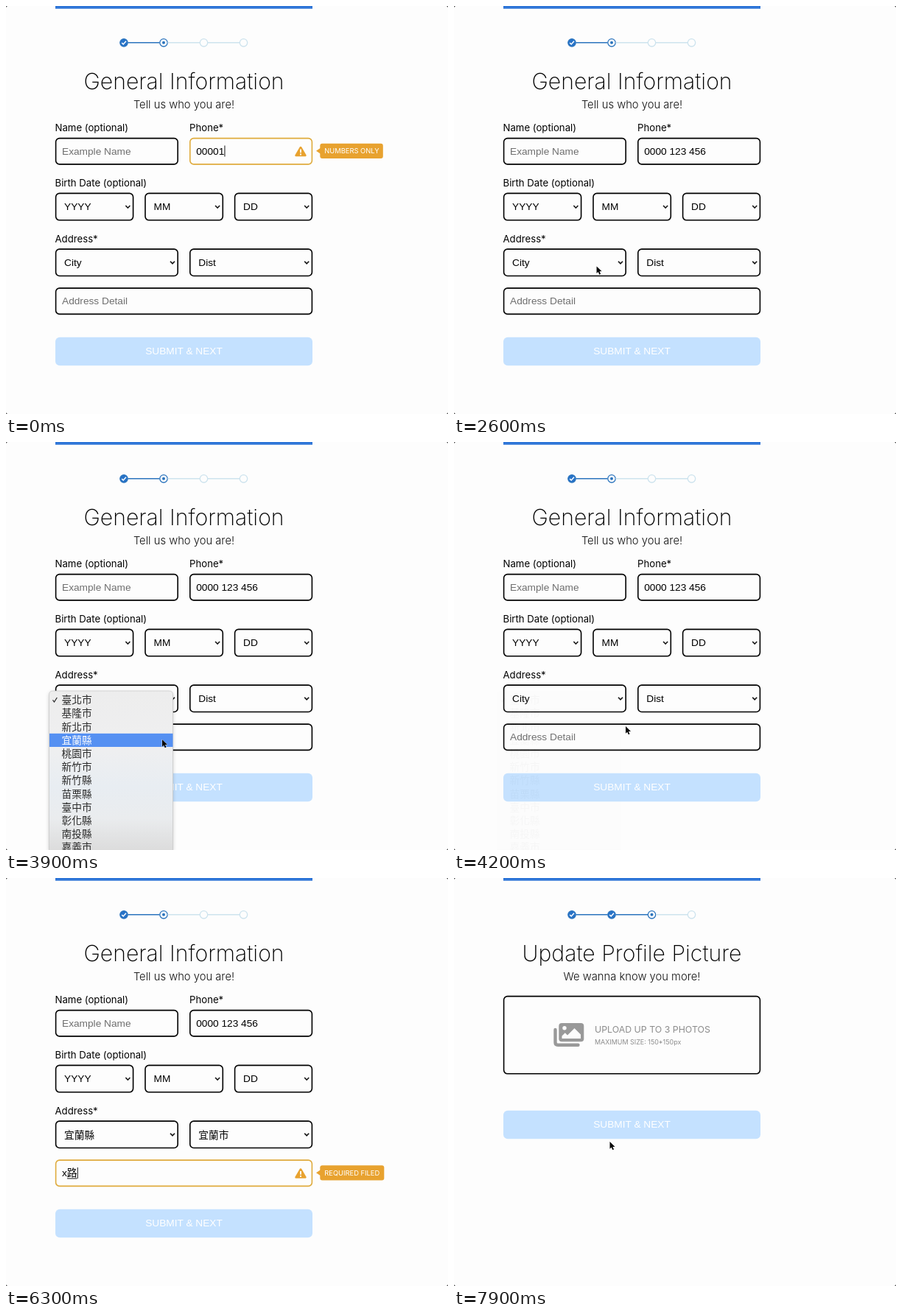
An HTML page for the animation above (8000 ms loop, 600 px wide and 554 px high).

```html
<!DOCTYPE html>
<html lang="en">
<head>
<meta charset="utf-8">
<title>Sign-up form</title>
<style>
  html, body { margin: 0; width: 100%; height: 100%; overflow: hidden; background: #fdfdfd; }
  svg { display: block; }
  text { white-space: pre; font-optical-sizing: none; }
  .ui { font-family: Inter, "Noto Sans", sans-serif; }
  .field { font: 13.7px "Liberation Sans", "Noto Sans CJK TC", "Noto Sans CJK", sans-serif; }
  .menu { font: 13.7px "Noto Sans CJK TC", "Noto Sans CJK", sans-serif; }
</style>
</head>
<body>
<svg id="stage" width="600" height="554" viewBox="0 0 600 554"></svg>
<script>
const LOOP = 8000, STEP = 100;
const BLUE = '#2f76d8', PALE = '#c4e1ff', ORANGE = '#e8a22f', GREY = '#6e6e6e', INK = '#000';

// [time, value] tables
const PHONE = [[0, '00001'], [200, '000012'], [400, '0000123'], [600, '00001234'],
  [800, '000012345'], [1000, '0000 123 456']];
const STREET = [[0, ''], [5000, 'x'], [5800, 'xㄌ'], [6000, 'xㄌㄨ'], [6200, 'x路']];
const PHONE_BLUR = 2700, STREET_FOCUS = 4700, VALID = 6500, NEXT_PAGE = 7600;
const MENU_OPEN = 2800, MENU_PICK = 3950, MENU_FADE = 300, PICKED = 4300;
const CITIES = ['臺北市', '基隆市', '新北市', '宜蘭縣', '桃園市', '新竹市', '新竹縣', '苗栗縣',
  '臺中市', '彰化縣', '南投縣', '嘉義市'];

// [time, x, y] of the pointer tip, one table per visible stretch
const POINTER = [
  [[1500, 300, 235], [1800, 258, 306], [2300, 202, 350], [2700, 192, 354], [3300, 197, 371],
    [3700, 206, 392], [3900, 212, 404], [4200, 233, 386], [4600, 230, 400], [4900, 230, 402]],
  [[7300, 236, 440], [7500, 228, 462], [7600, 226, 460], [7900, 211.5, 358]]
];

const stage = document.getElementById('stage');
const at = (table, t) => table.filter(row => row[0] <= t).pop();

function pointerAt(t) {
  const path = POINTER.find(p => t >= p[0][0] && t <= p[p.length - 1][0]);
  if (!path) return null;
  const i = Math.max(1, path.findIndex(p => p[0] >= t));
  const [t0, x0, y0] = path[i - 1], [t1, x1, y1] = path[i];
  const u = (t - t0) / (t1 - t0), e = u * u * (3 - 2 * u);
  return [x0 + (x1 - x0) * e, y0 + (y1 - y0) * e];
}

const text = (x, y, str, attrs = '', cls = 'field') =>
  `<text class="${cls}" x="${x}" y="${y}" ${attrs}>${str.replace('&', '&amp;')}</text>`;
const ui = (x, y, str, size, attrs = '') =>
  text(x, y, str, `font-size="${size}" ${attrs}`, 'ui');
const box = (x, y, w, h, color = INK) =>
  `<rect x="${x}" y="${y}" width="${w}" height="${h}" rx="5" fill="none" stroke="${color}" stroke-width="1.6"/>`;

function select(x, y, w, value) {
  const cx = x + w - 7.2, cy = y + 18.3;
  const cjk = value.charCodeAt(0) > 255;
  return box(x, y, w, 36.4) + text(x + 11.5, y + (cjk ? 24.2 : 22.8), value, `fill="${INK}"`) +
    `<path d="M${cx - 3} ${cy - 1.7}l3 3.2l3-3.2" fill="none" stroke="#111" stroke-width="1.6"/>`;
}

function stepper(current) {
  const xs = [160, 214, 268.5, 322.5], y = 49.8, dark = '#2b74bd', light = '#cde3ee';
  return xs.map((x, i) => {
    const color = i <= current ? dark : light;
    const line = i ? `<path d="M${xs[i - 1] + 5.5} ${y}H${x - 5.5}" stroke="${color}" stroke-width="1.5"/>` : '';
    const ring = `<circle cx="${x}" cy="${y}" r="5.2" fill="${i < current ? '#2873c8' : '#fdfdfd'}" stroke="${color}" stroke-width="1.3"/>`;
    const mark = i < current
      ? `<path d="M${x - 2.8} ${y + .2}l2 2l3.8-4.2" fill="none" stroke="#fff" stroke-width="1.5"/>`
      : i === current ? `<circle cx="${x}" cy="${y}" r="2" fill="${dark}"/>` : '';
    return line + ring + mark;
  }).join('');
}

function header(step, title, subtitle) {
  const middle = 'text-anchor="middle"';
  return `<rect x="67" width="349" height="3.7" fill="${BLUE}"/>` + stepper(step) +
    ui(241.5, 112.8, title, 30.2, `${middle} font-weight="250" fill="${INK}"`) +
    ui(241.5, 138.9, subtitle, 14.75, `${middle} font-weight="300" fill="#111"`);
}

const button = (y, active) =>
  `<rect x="67" y="${y}" width="349" height="38.5" rx="6" fill="${active ? BLUE : PALE}"/>` +
  text(241.5, y + 23.4, 'SUBMIT & NEXT', 'text-anchor="middle" fill="#fff"');

// Warning sign inside the field and its callout to the right
function warning(y, message, width) {
  return `<path d="M400 ${y - 5}L406.4 ${y + 6}H393.6Z" fill="${ORANGE}" stroke="${ORANGE}" stroke-width="2.6" stroke-linejoin="round"/>
    <path d="M400 ${y - 2.6}V${y + 2.2}M400 ${y + 3.6}V${y + 5.4}" stroke="#fff" stroke-width="1.8"/>
    <rect x="426.3" y="${y - 10.3}" width="${width}" height="20.4" rx="3" fill="${ORANGE}"/>
    <path d="M421 ${y - .2}l6-4v8z" fill="${ORANGE}"/>` +
    ui(432.3, y + 3.1, message, 9.35, 'fill="#fff"');
}

function input(id, x, y, w, value, hint, error) {
  return box(x, y, w, 35.3, error ? '#dfab3d' : INK) +
    text(x + 8.4, y + 21.9, value || hint, `id="${id}" fill="${value ? INK : GREY}"`);
}

function menu(t, pointer) {
  if (t < MENU_OPEN || t >= MENU_PICK + MENU_FADE) return '';
  const fade = Math.max(0, (t - MENU_PICK) / MENU_FADE);
  const top = 341.2, row = 18.2;
  const hot = Math.floor((Math.min(pointer[1], 412) - top) / row);
  const rows = CITIES.map((city, i) => {
    const y = top + i * row, on = i === hot && !fade;
    return (on ? `<rect x="59" y="${y}" width="167.5" height="${row}" fill="#5590f2"/>` : '') +
      text(75.5, y + 14, city, `fill="${on ? '#fff' : '#2b2b2b'}"`, 'menu') +
      (i ? '' : `<path d="M63.5 ${y + 9.2}l2 2.6l3.8-6" fill="none" stroke="${on ? '#fff' : '#222'}" stroke-width="1.2"/>`);
  }).join('');
  return `<g opacity="${(1 - fade) ** 2}">
    <path d="M58.5 554V343q0-5 5-5H221.5q5 0 5 5V554" fill="url(#glass)" stroke="#c4c4c4" stroke-width=".7" filter="url(#shade)"/>${rows}</g>`;
}

function formPage(t, pointer) {
  const phone = at(PHONE, t)[1], street = at(STREET, t)[1];
  const badPhone = t < 1000, badStreet = t >= 5000 && t < VALID, picked = t >= PICKED;
  const label = (x, y, str) => ui(x, y, str, 13.2, `fill="${INK}"`);
  return header(1, 'General Information', 'Tell us who you are!') +
    label(66.5, 170, 'Name (optional)') + label(249, 170, 'Phone*') +
    label(66.5, 245, 'Birth Date (optional)') + label(66.5, 321, 'Address*') +
    input('name', 67.6, 179.6, 165.6, '', 'Example Name') +
    input('phone', 249.8, 179.6, 165.6, phone, '', badPhone) +
    select(67.6, 254.4, 105, 'YYYY') + select(189, 254.4, 105.3, 'MM') + select(310.6, 254.4, 104.8, 'DD') +
    select(67.6, 330.1, 165.6, picked ? '宜蘭縣' : 'City') +
    select(249.8, 330.1, 165.6, picked ? '宜蘭市' : 'Dist') +
    input('street', 67.6, 383.1, 347.8, street, 'Address Detail', badStreet) +
    (badPhone ? warning(197, 'NUMBERS ONLY', 85.5) : '') +
    (badStreet ? warning(400.5, 'REQUIRED FILED', 87) : '') +
    button(449.7, t >= VALID) + menu(t, pointer);
}

function photoPage() {
  const grey = '#999';
  return header(2, 'Update Profile Picture', 'We wanna know you more!') +
    box(67.6, 160.6, 347.8, 105.2) +
    `<path d="M137.5 206V223.3q0 3.5 3.5 3.5H168.500" fill="none" stroke="${grey}" stroke-width="4.4" stroke-linecap="round"/>
     <rect x="142.300" y="197" width="34" height="25.300" rx="4" fill="${grey}"/>
     <circle cx="150" cy="203.700" r="2.700" fill="#fdfdfd"/>
     <path d="M146.500 218v-3.500l4.300-4.300l3.200 3.200l9.500-9.500l8.500 8.500V218z" fill="#fdfdfd"/>` +
    ui(191, 209.7, 'UPLOAD UP TO 3 PHOTOS', 12.35, 'fill="#8c8c8c"') +
    ui(191, 226.2, 'MAXIMUM SIZE: 150*150px', 8.95, 'fill="#8c8c8c"') +
    button(315.8, false);
}

const arrow = ([x, y]) =>
  `<path transform="translate(${x} ${y}) scale(.88)" d="M0 0V11l2.5-2.3l1.8 4.1l2-.9l-1.8-4H8z" fill="#080808" stroke="#fff" stroke-width=".9" paint-order="stroke"/>`;

const DEFS = `<defs>
  <linearGradient id="glass" x1="0" y1="0" x2="0" y2="1">
    <stop offset="0" stop-color="#ededed"/><stop offset=".35" stop-color="#efeff0"/>
    <stop offset=".6" stop-color="#e8edf2"/><stop offset=".8" stop-color="#eaecee"/>
    <stop offset="1" stop-color="#dcdcdc"/>
  </linearGradient>
  <filter id="shade"><feDropShadow dx="0" dy="2" stdDeviation="2.5" flood-opacity=".18"/></filter>
</defs>`;
const CORNERS = '<path d="M0 0h2L0 2zM600 0v2l-2-2zM0 554v-2l2 2zM600 554h-2l2-2z" fill="#555"/>';

function drawCaret(t) {
  const onPhone = t < PHONE_BLUR;
  if (!onPhone && t < STREET_FOCUS) return;
  const [changed, value] = at(onPhone ? PHONE : STREET, t);
  const since = Math.max(changed, onPhone ? 0 : STREET_FOCUS, t >= VALID ? VALID : 0);
  const node = document.getElementById(onPhone ? 'phone' : 'street');
  const left = +node.getAttribute('x'), y = +node.getAttribute('y');
  const right = left + (value ? node.getComputedTextLength() : 0);
  let out = '';
  if ((t - since) % 1000 < 500) out += `<path d="M${right + .7} ${y - 12}V${y + 3}" stroke="#111"/>`;
  // Text still being composed is underlined
  if (!onPhone && value.length > 1 && t < VALID)
    out += `<path d="M${left + 7} ${y + 3}H${right}" stroke="#111"/>`;
  stage.insertAdjacentHTML('beforeend', out);
}

function draw(t) {
  const pointer = pointerAt(t), form = t < NEXT_PAGE;
  stage.innerHTML = DEFS + CORNERS + (form ? formPage(t, pointer) : photoPage()) + (pointer ? arrow(pointer) : '');
  if (form) drawCaret(t);
}

const start = performance.now();
let shown = -1;
function tick() {
  const t = Math.floor((performance.now() - start) % LOOP / STEP) * STEP;
  if (t !== shown) draw(shown = t);
  requestAnimationFrame(tick);
}
tick();
</script>
</body>
</html>
```
